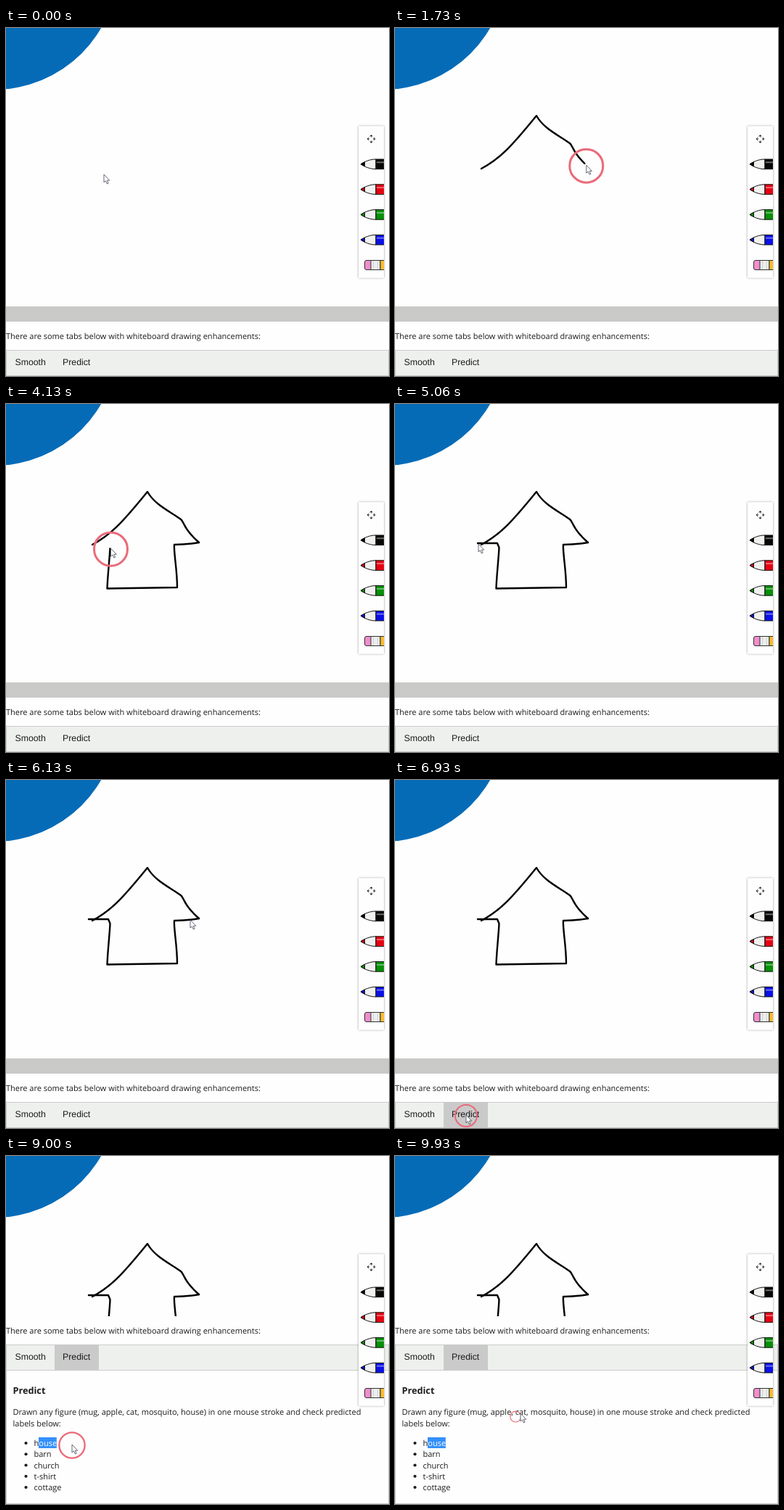
Recreate the animation shown at these times as an HTML page. Size 528 px wide and 480 px high, loop 10 s.

```html
<!DOCTYPE html>
<html lang="en">
<head>
<meta charset="utf-8">
<title>Whiteboard</title>
<style>
  html, body { margin: 0; width: 100%; height: 100%; overflow: hidden; background: #fdfefd; }
  svg { display: block; }
  text { font: 11px "Open Sans", "Noto Sans", sans-serif; fill: #1c1c1c; text-rendering: geometricPrecision; white-space: pre; }
  .tab { font: 12.3px "Liberation Sans", Arial, sans-serif; }
  .title { font-size: 12.7px; font-weight: bold; }
  .line { fill: none; stroke: #000; stroke-width: 2.4; stroke-linecap: round; stroke-linejoin: round; }
  .icon { fill: none; stroke: #222; }
</style>
</head>
<body>
<svg width="528" height="480" viewBox="0 0 528 480">
  <defs>
    <filter id="shadow" x="-30%" y="-10%" width="160%" height="120%">
      <feDropShadow dx="0" dy="0" stdDeviation="1.6" flood-opacity=".4"/>
    </filter>
    <clipPath id="panelClip"><rect x="486" y="135" width="35" height="210"/></clipPath>
    <clipPath id="selClip"><rect id="selArea" x="45" y="572" height="15"/></clipPath>
  </defs>

  <circle cx="-16" cy="-85" r="169.9" fill="#066bb7"/>
  <g id="drawing"></g>
  <rect y="384" width="528" height="96" fill="#c9cac8"/>

  <g id="page">
    <rect y="405" width="528" height="260" fill="#fdfefd"/>
    <text x="0" y="429">There are some tabs below with whiteboard drawing enhancements:</text>
    <rect x=".5" y="444.5" width="527" height="35" fill="#eef0ee" stroke="#ccc"/>
    <rect id="tab" x="67" y="444.5" width="61" height="35"/>
    <text class="tab" x="12.5" y="465">Smooth</text>
    <text class="tab" x="78" y="465">Predict</text>
    <g id="content">
      <path d="M.5 480V663.5H527.5V480" fill="none" stroke="#ccc"/>
      <text class="title" x="9.5" y="511.5">Predict</text>
      <text x="9.5" y="541">Drawn any figure (mug, apple, cat, mosquito, house) in one mouse stroke and check predicted</text>
      <text x="9.5" y="556.5">labels below:</text>
      <g id="labels"></g>
      <g clip-path="url(#selClip)">
        <rect x="38" y="572" width="40" height="15" fill="#3390fb"/>
        <text x="38.5" y="584" style="fill:#fff">house</text>
      </g>
    </g>
  </g>

  <rect x="486" y="135.5" width="35" height="209" fill="#fdfefd" filter="url(#shadow)"/>
  <g id="tools" clip-path="url(#panelClip)"></g>
  <circle id="ring" fill="none" stroke="#ea6a7a"/>
  <path id="cursor" d="M0 0V11L2.5 8.8 4.3 13 6.1 12.2 4.4 8.2H7.7Z" fill="#fff" stroke="#4c5060" stroke-width=".85" stroke-linejoin="round"/>
</svg>
<script>
const $ = id => document.getElementById(id);
const clamp = v => Math.min(1, Math.max(0, v));
const set = (el, attrs) => Object.entries(attrs).forEach(([name, value]) => el.setAttribute(name, value));
const show = (el, on) => set(el, { visibility: on ? "visible" : "hidden" });

$("labels").innerHTML = ["house", "barn", "church", "t-shirt", "cottage"].map((word, i) => {
  const y = 584 + i * 15.25;
  return `<circle cx="27.5" cy="${y - 4}" r="2.1" fill="#1c1c1c"/><text x="38.5" y="${y}">${word}</text>`;
}).join("");

const arrow = angle =>
  `<path class="icon" transform="translate(503.5 153) rotate(${angle})" d="M0-2.4V-5M-1.9-3.5L0-5.4 1.9-3.5"/>`;
const pen = (color, i) => `<g transform="translate(489 ${187.8 + i * 34.8})" stroke="#111">
  <path d="M0 0C6-4 13-6.8 21-6.8V6.8C13 6.8 6 4 0 0Z" fill="#f1f1f0"/>
  <path d="M0 0L5.5-3V3Z" fill="${color}"/>
  <rect x="21" y="-6.8" width="16" height="13.6" fill="${color}"/>
  <path d="M22-2.5H34" stroke="#fff" stroke-opacity=".4" stroke-width="2"/></g>`;
const eraser = `<g stroke="#333" transform="translate(494.5 327)">
  <rect y="-6.5" width="12" height="13" rx="2.5" fill="#ee8fcb"/>
  <rect x="8.5" y="-6.5" width="13" height="13" fill="#eceeee"/>
  <path d="M12-6V6M18-6V6" stroke="#d0d2d2"/>
  <rect x="21.5" y="-6.5" width="9" height="13" fill="#f8bd2c"/></g>`;
$("tools").innerHTML = [0, 90, 180, 270].map(arrow).join("")
  + ["#080808", "#e60012", "#069006", "#0a10e8"].map(pen).join("") + eraser;

// Pointer moves: each path continues where the previous one ended.
let last = "134 201";
function move(start, end, path, draws = false) {
  const el = document.createElementNS("http://www.w3.org/2000/svg", "path");
  set(el, { d: `M${last}${path}`, class: "line" });
  if (draws) $("drawing").append(el);
  const length = el.getTotalLength(), { x, y } = el.getPointAtLength(length);
  last = `${x} ${y}`;
  return { start, el, length, draws, progress: t => clamp((t - start) / (end - start)) };
}
const roof = "C145 180 160 164 195 121C205 139 226 148 241 159C246 163 244 172 266 191";
const walls = "Q250 194 232 194C231 205 236 228 236 253L139.5 254.5C140 238 143 212 143.5 198L141 192H114";
const moves = [
  move(200, 480, "L119 194"),
  move(600, 1755, roof, true),
  move(2310, 4380, walls, true),
  move(5100, 6000, "H253"),
  move(6160, 6750, "L97 461"),
  move(7300, 7850, "L80 397"),
  move(8200, 8480, "H45"),
  move(8600, 8900, "H90"),
  move(9200, 9930, "L172 354"),
];
const presses = [[500, 4850], [6780, 6900], [8520, 8980], [9840, 9870]];
const OPEN = 6900, SCROLL = 7050, SELECT = 8520, RING = 90;

function pointer(t) {
  const { el, length, progress } = moves.findLast(m => t >= m.start) || moves[0];
  const { x, y } = el.getPointAtLength(length * progress(t));
  return [x + 1, y + 1];
}

function draw(t) {
  const [x, y] = pointer(t);
  set($("cursor"), { transform: `translate(${x} ${y})` });

  for (const { el, length, progress } of moves.filter(m => m.draws)) {
    const drawn = length * progress(t - 10);
    set(el, { "stroke-dasharray": `${drawn} 2000` });
    show(el, drawn > 0);
  }

  const press = presses.find(([down, up]) => t >= down && t < up + RING);
  show($("ring"), press);
  if (press) {
    const size = clamp(Math.min(t - press[0], press[1] + RING - t) / RING);
    const [cx, cy] = pointer(Math.min(t, press[1]));
    set($("ring"), { cx, cy: cy + 1, r: 23 * size, "stroke-width": 0.2 + 2.8 * size });
  }

  const open = t >= OPEN, hover = y > 444 && x > 67 && x < 128;
  set($("tab"), { fill: open ? "#c9cac9" : hover ? "#ddd" : "none" });
  show($("content"), open);
  set($("page"), { transform: `translate(0 ${-184 * clamp((t - SCROLL) / 280)})` });

  const letters = t > SELECT ? Math.round(4 * clamp((x - 45) / 25)) : 0;
  set($("selArea"), { width: letters * 6.2 });
}

function frame() {
  draw(performance.now() % 10000);
  requestAnimationFrame(frame);
}
frame();
</script>
</body>
</html>
```
